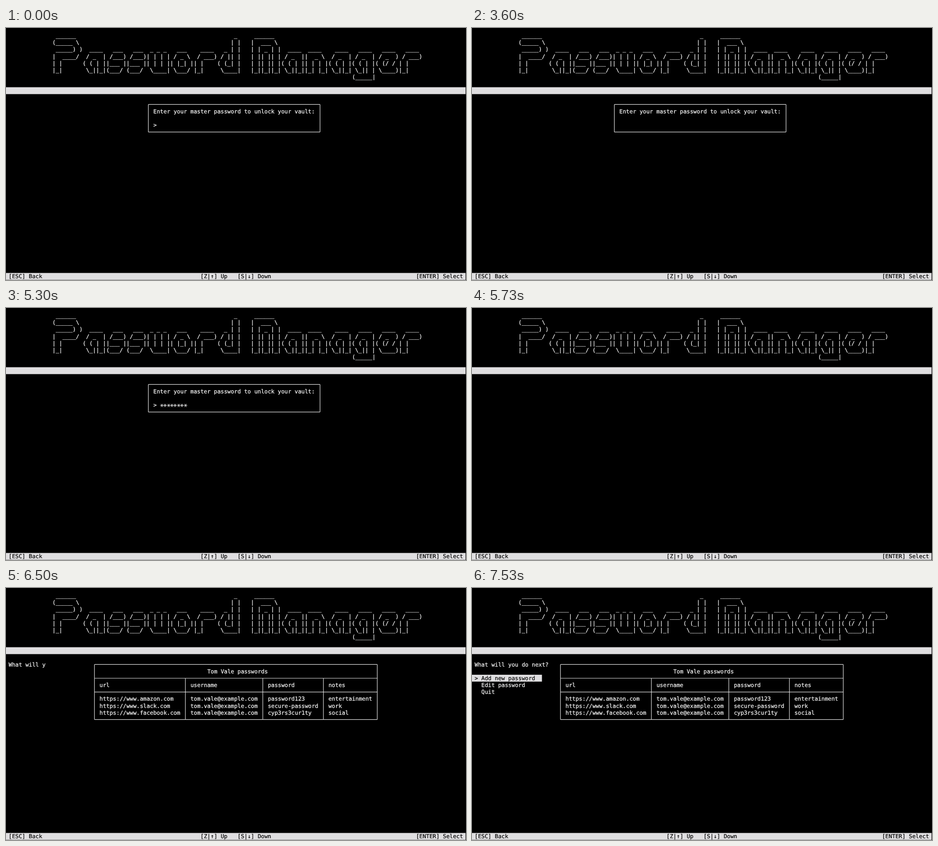
Write an HTML page that moves like this. It is 1010 px wide and 555 px high and loops after 8 s.

```html
<!DOCTYPE html>
<html lang="en">
<head>
<meta charset="utf-8">
<title>Password Manager</title>
<style>
  html, body { margin: 0; width: 100%; height: 100%; overflow: hidden; background: #000; }
  svg { display: block; width: 100%; height: 100%; }
  text {
    font: 12.278px "DejaVu Sans Mono", monospace;
    fill: #f2f2f2;
    stroke: #f2f2f2;
    stroke-width: 0.3;
    white-space: pre;
    text-rendering: geometricPrecision;
  }
  text.dark { fill: #000; stroke: #000; stroke-width: 0.2; }
  text.star { font-size: 16px; text-anchor: middle; stroke-width: 0.1; }
  rect { fill: #dfdee0; }
  path { fill: none; stroke: #e4e4e4; stroke-width: 1.2; }
</style>
</head>
<body>
<svg id="stage" viewBox="0 0 1010 555"></svg>
<script>
const LOOP = 8000;
const CELL = 7.392, LINE = 15.15, LEFT = 5.75, TOP = -5.9;
const stage = document.getElementById('stage');

const colX = c => LEFT + c * CELL;
const rowY = r => TOP + r * LINE;
const midX = c => colX(c + 0.5);
const midY = r => rowY(r + 0.5) + 0.1;

function add(parent, tag, attrs = {}, content = '') {
  const el = document.createElementNS('http://www.w3.org/2000/svg', tag);
  for (const key in attrs) el.setAttribute(key, attrs[key]);
  el.textContent = content;
  return parent.appendChild(el);
}
const group = () => add(stage, 'g');
const print = (parent, col, row, str, cls = '') =>
  add(parent, 'text', { x: colX(col), y: rowY(row) + 11.9, class: cls }, str);
const bar = (parent, row, width) =>
  add(parent, 'rect', { x: 0, y: rowY(row), width, height: LINE });
const hline = (c1, c2, r) => `M${midX(c1)} ${midY(r)}H${midX(c2)}`;
const vline = (c, r1, r2) => `M${midX(c)} ${midY(r1)}V${midY(r2)}`;
const frame = (c1, c2, r1, r2) =>
  hline(c1, c2, r1) + hline(c1, c2, r2) + vline(c1, r1, r2) + vline(c2, r1, r2);
const show = (el, on) => el.setAttribute('visibility', on ? 'visible' : 'hidden');

// Banner letters, rows separated by commas
const raw = String.raw;
const glyphs = {
  P: raw` ______,(_____ \, _____) ),|  ____/,| |,|_|`,
  a: raw`,,  ____, / _  |,( ( | |, \_||_|`,
  s: raw`,,  ___, /___),|___ |,(___/`,
  w: raw`,, _ _ _,| | | |,| | | |, \____|`,
  o: raw`,,  ___, / _ \,| |_| |, \___/`,
  r: raw`,,  ____, / ___),| |,|_|`,
  d: raw`     _,    | |,  _ | |, / || |,( (_| |, \____|`,
  ' ': '   ',
  M: raw` ______,|  ___ \,| | _ | |,| || || |,| || || |,|_||_||_|`,
  n: raw`,, ____,|  _ \,| | | |,|_| |_|`,
  g: raw`,,  ____, / _  |,( ( | |, \_|| |,(_____|`,
  e: raw`,,  ____, / _  ),( (/ /, \____)`
};
// The lowercase g has one more row than the rest, below the baseline
function banner(word, col, row) {
  const lines = Array(7).fill('');
  for (const ch of word) {
    const rows = glyphs[ch].split(',');
    const width = Math.max(...rows.map(s => s.length));
    lines.forEach((line, i) => lines[i] = line + (rows[i] || '').padEnd(width));
  }
  lines.forEach((line, i) => {
    const str = line.trimEnd(), pad = str.length - str.trimStart().length;
    print(stage, col + pad, row + i, str.trimStart());
  });
}

// Fixed screen parts
banner('Password Manager', 13, 1);
bar(stage, 9, 1009);
bar(stage, 36, 1009);
print(stage, 0, 36, '[ESC] Back', 'dark');
print(stage, 57, 36, '[Z|↑] Up   [S|↓] Down', 'dark');
print(stage, 121, 36, '[ENTER] Select', 'dark');

// Unlock prompt
const prompt = group();
add(prompt, 'path', { d: frame(41, 92, 11, 15) });
print(prompt, 43, 12, 'Enter your master password to unlock your vault:');
const caret = print(stage, 43, 14, '>');
const keys = [2600, 3230, 3630, 3770, 4400, 4870, 5130, 5300];
const redraws = [3230, 3630, 4400, 4870, 5130];
const stars = keys.map((_, i) => add(stage, 'text', {
  class: 'star', y: 8.2,
  transform: `translate(${midX(45 + i)} 214.6) rotate(90)`
}, '*'));

// Vault table
const vault = group();
add(vault, 'path', {
  d: frame(25, 109, 11, 19) + hline(25, 109, 13) + hline(25, 109, 15) +
     [52, 75, 93].map(c => vline(c, 13, 19)).join('')
});
print(vault, 59, 12, 'Tom Vale passwords');
const user = 'tom.vale@example.com';
[
  [14, 'url', 'username', 'password', 'notes'],
  [16, 'https://www.amazon.com', user, 'password123', 'entertainment'],
  [17, 'https://www.slack.com', user, 'secure-password', 'work'],
  [18, 'https://www.facebook.com', user, 'cyp3rs3cur1ty', 'social']
].forEach(([row, ...cells]) =>
  cells.forEach((str, i) => print(vault, [27, 54, 77, 95][i], row, str)));

// Question and menu
const question = 'What will you do next?';
const typed = print(stage, 0, 11, '');
const menu = ['> Add new password', '  Edit password', '  Quit'].map((str, i) => {
  const item = group();
  if (i === 0) bar(item, 13, colX(20));
  const pad = str.length - str.trimStart().length;
  print(item, pad, 13 + i, str.trimStart(), i === 0 ? 'dark' : '');
  return item;
});

function render(t) {
  const locked = t < 5730;
  const wiped = redraws.some(k => t >= k - 30 && t < k);
  show(prompt, locked);
  show(caret, locked && !wiped);
  stars.forEach((star, i) => show(star, locked && !wiped && t >= keys[i]));
  show(vault, t >= 5770);
  const count = Math.max(0, Math.floor((t - 5830) / 66.67) + 1);
  typed.textContent = question.slice(0, count);
  menu.forEach((item, i) => show(item, t >= 7470 + i * 30));
}

function tick() {
  render(performance.now() % LOOP);
  requestAnimationFrame(tick);
}
tick();
</script>
</body>
</html>
```
